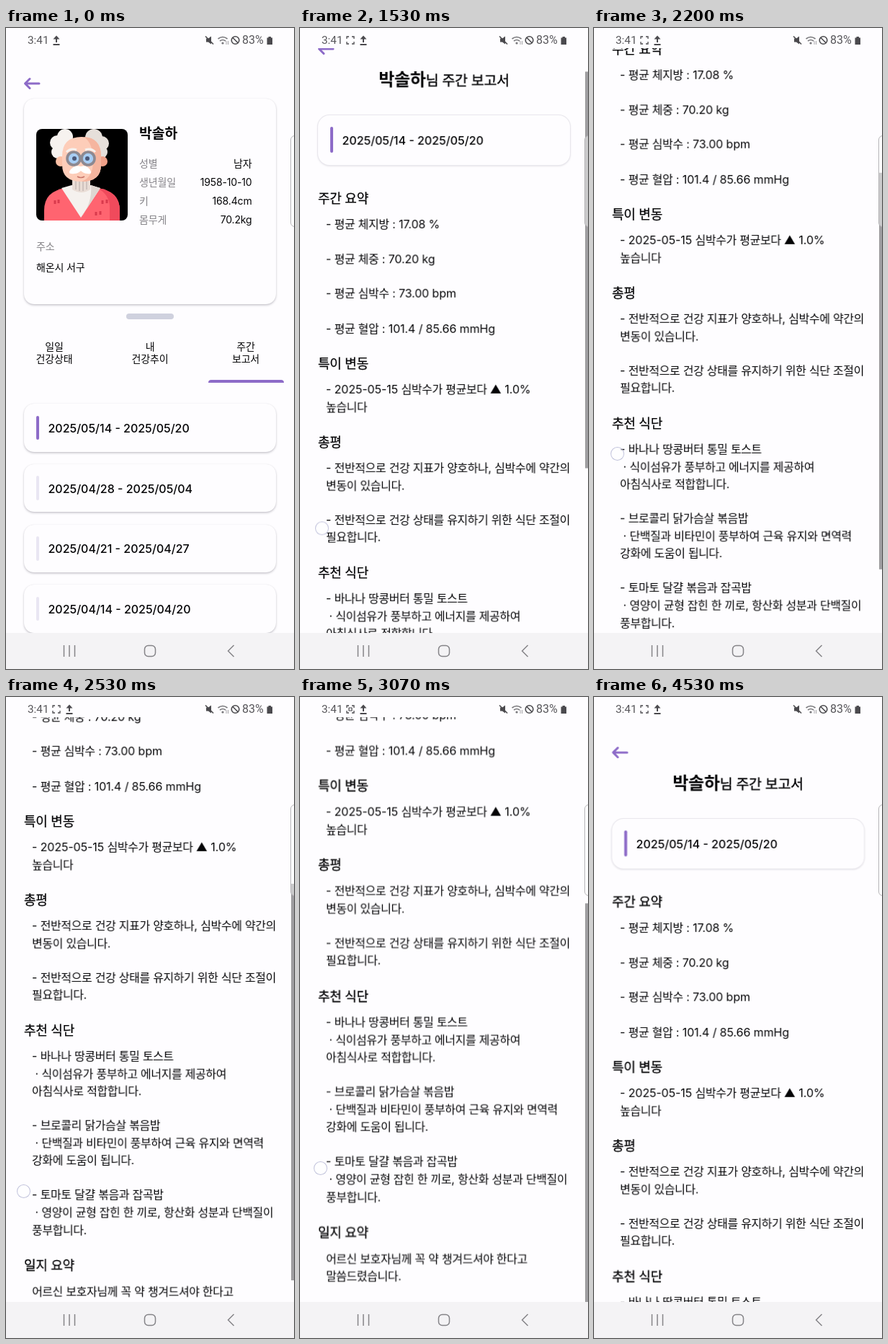
Animation, 400 px wide and 889 px high, one loop 5070 ms. Source, as an HTML page:

```html
<!DOCTYPE html>
<html lang="ko">
<head>
<meta charset="utf-8">
<title>주간 보고서</title>
<style>
  html, body { margin: 0; width: 100%; height: 100%; overflow: hidden; background: #fefdff; }
  #stage { position: relative; width: 400px; height: 889px; overflow: hidden; background: #fefdff;
    font-family: Inter, "Noto Sans CJK KR", "Noto Sans CJK", sans-serif; color: #050507; }
  #stage div, #stage svg, #stage i { position: absolute; box-sizing: border-box; }
  .view { left: 0; top: 28px; width: 400px; height: 811px; overflow: hidden; background: #fefdff; }
  .page { left: 0; top: -28px; width: 400px; height: 1240px; }
  #stretch { left: 0; top: 0; width: 400px; height: 811px; transform-origin: 50% 100%; }
  .t { line-height: 24px; white-space: pre; }
  .body { font-size: 16px; letter-spacing: -.1px; }
  .body span { letter-spacing: -.4px; }
  .head { font-size: 18px; font-weight: 500; letter-spacing: -.2px; -webkit-text-stroke: .25px; }
  .date { font-size: 16px; font-weight: 500; }
  .small { font-size: 14px; letter-spacing: -.15px; }
  .grey { color: #858388; }
  .right { transform: translateX(-100%); }
  .mid { transform: translateX(-50%); }
  .name { font-size: 19.3px; font-weight: 600; }
  .title { font-size: 19.5px; font-weight: 500; letter-spacing: -.25px; -webkit-text-stroke: .35px; }
  .title b { font-size: 24px; font-weight: 600; -webkit-text-stroke: 0; }
  .card { left: 25px; width: 350px; border-radius: 14px; background: #fefdff;
    box-shadow: 0 1.5px 3px rgba(40, 35, 55, .26), 0 0 1px rgba(40, 35, 55, .1); }
  .flat { border-radius: 16px; box-shadow: 0 0 0 1px #e9e7ed, 0 1px 3px rgba(40, 35, 55, .2); }
  .bar { left: 42px; width: 4px; border-radius: 2px; background: #8d6bc8; }
  .bone { border-radius: 4px; overflow: hidden; background: #f9f8fa; }
  .bone i { left: -70px; top: 0; bottom: 0; width: 240px; transform-origin: 50% 50%;
    background: linear-gradient(90deg, rgba(0,0,0,0), rgba(0,0,0,.05) 45%, rgba(0,0,0,.05) 55%, rgba(0,0,0,0)); }
  #thumb { left: 396px; top: 0; width: 4px; height: 549.5px; background: #9f9ea1; }
  #handle { left: 395px; top: 149px; width: 12px; height: 127px; border-radius: 6px;
    border: 1px solid #b6b5b8; background: rgba(255, 255, 255, .45); }
  #finger { left: -9.5px; top: -9.5px; width: 19px; height: 19px; border-radius: 50%;
    border: 1.3px solid rgba(150, 154, 195, .6); background: rgba(255, 255, 255, .45); }
  #nav { left: 0; top: 839px; width: 400px; height: 50px; background: #f4f3f5; }
  .clock { font: 15.3px/24px Roboto, sans-serif; color: #57565a; }
</style>
</head>
<body>
<div id="stage">
  <div class="view">
    <div id="stretch">
      <div class="page" id="report">
        <div class="card flat" style="top:169px;height:69px"></div>
        <div class="bar" style="top:185px;height:36px"></div>
        <div id="loaded"></div>
        <div id="skeleton"></div>
      </div>
      <div id="thumb"></div>
    </div>
  </div>

  <div class="view" id="listView">
    <div class="page" id="list">
      <div class="card" style="top:98px;height:285px"></div>
      <svg style="left:42px;top:140px;border-radius:8px" width="127" height="127" viewBox="42 140 127 127">
        <rect x="42" y="140" width="127" height="127"/>
        <g fill="#f6f2ef">
          <circle cx="82" cy="151" r="11"/><circle cx="71" cy="159" r="10"/>
          <circle cx="72" cy="172" r="9"/><circle cx="84" cy="165" r="13"/>
        </g>
        <g fill="#e6dfda">
          <circle cx="122" cy="152" r="12"/><circle cx="133" cy="160" r="10"/>
          <circle cx="132" cy="172" r="9"/><circle cx="120" cy="165" r="13"/>
        </g>
        <circle cx="76" cy="185" r="7" fill="#fbc0a6"/>
        <circle cx="134" cy="185" r="7" fill="#f0a189"/>
        <path d="M53 267v-14q0-27 30-31h44q31 4 31 31v14z" fill="#ff6470"/>
        <path d="M127 222q31 4 31 31v14h-14v-18q0-18-17-27z" fill="#f04a5c"/>
        <path d="M77 222l14-4h27l13 4-27 41z" fill="#f5f1ee"/>
        <path d="M118 218l13 4-27 41q16-20 14-45z" fill="#ded6d1"/>
        <path d="M92 205h25v19q-12 8-25 0z" fill="#e9dcd5"/>
        <path d="M97 211v13M102 211v15M107 211v15M112 211v13" stroke="#c9bcb8" stroke-width="1.6"/>
        <path d="M78 178q0-27 27-27t27 27v12q0 23-27 23t-27-23z" fill="#fdcdb9"/>
        <path d="M108 151q24 1 24 27v12q0 23-27 23 16-6 16-28 0-26-13-34z" fill="#f5b59f"/>
        <g fill="#a8cdf3" stroke="#8d8991" stroke-width="3.6">
          <circle cx="94" cy="181" r="9"/><circle cx="114" cy="181" r="9"/>
        </g>
        <g fill="#4b5878"><circle cx="95" cy="181" r="3"/><circle cx="113" cy="181" r="3"/></g>
        <path d="M84 172q6-6 14-3M110 169q8-3 14 3" stroke="#f6f2ef" stroke-width="3" fill="none"/>
        <path d="M104 192q9-3 14 7 1 4-5 3-5 0-9-4-4 4-9 4-8 1-7-3 6-10 16-7z" fill="#fff"/>
        <path d="M99 206q5 3 10 0" stroke="#c9776a" stroke-width="1.6" fill="none"/>
        <path d="M68 239v5M73 238v5M134 239v5M140 238v5M125 255v5M131 254v5" stroke="#d93a4d" stroke-width="3"/>
      </svg>
      <div style="left:167px;top:396px;width:66px;height:8px;border-radius:4px;background:#cfd1de"></div>
      <div style="left:281px;top:487.5px;width:105px;height:4px;border-radius:4px 4px 0 0;background:#8d6bc8"></div>
    </div>
  </div>

  <div id="finger"></div>
  <div id="handle"></div>

  <div class="t clock" style="left:30px;top:5px">3:41</div>
  <div class="t clock" style="left:328px;top:5px;font-size:16px">83%</div>
  <svg width="400" height="28" fill="none" stroke="#4b4a4e" stroke-width="1.6">
    <g id="upload">
      <path d="M88 20v-7M83.5 23h9" stroke-width="2"/>
      <path d="M83.5 15.5l4.5-5 4.5 5z" fill="#4b4a4e" stroke="none"/>
    </g>
    <path id="corners" d="M65 15v-3h3M72 12h3v3M75 19v3h-3M68 22h-3v-3" stroke-width="1.3"/>
    <path id="core" d="M68 15h4v4h-4z" stroke-width="1.2"/>
    <path d="M278 14.5h3l4-3v11l-4-3h-3z" fill="#4b4a4e" stroke="none"/>
    <path d="M277 11.5l11 11"/>
    <path d="M294.500 15q6.500-5 13 0M297 18q4-3 8 0" stroke="#77767a"/>
    <circle cx="301" cy="21" r="1.6" fill="#77767a" stroke="none"/>
    <path d="M306 18v5M308.500 23v-5" stroke="#a3a2a6" stroke-width="1"/>
    <circle cx="318.500" cy="17" r="5.300"/>
    <path d="M314.800 13.300l7.400 7.400"/>
    <path d="M362.500 13.500h2v-1.500h3.500v1.500h2v9.500h-7.500z" fill="#4b4a4e" stroke="none"/>
  </svg>

  <div id="nav">
    <svg width="400" height="50" fill="none" stroke="#858488" stroke-width="1.5">
      <path d="M80.500 17v16M88 17v16M95.500 17v16M316.500 17l-8 8 8 8"/>
      <rect x="192.500" y="17.500" width="15" height="15" rx="5"/>
    </svg>
  </div>
</div>

<script>
const LOOP = 5070, TICKS = 76;
const $ = id => document.getElementById(id);

function add(parent, cls, css, html = '') {
  const el = document.createElement('div');
  el.className = cls;
  el.style.cssText = css;
  el.innerHTML = html;
  parent.append(el);
  return el;
}
// x is the anchor, y the middle of the line
const text = (parent, cls, x, y, str) =>
  add(parent, 't ' + cls, `left:${x}px;top:${y - 12}px`, str);
// Hangul is set tighter than Latin
const tight = str => str.replace(/[가-힣]+/g, '<span>$&</span>');

const report = $('report'), list = $('list'), loaded = $('loaded'), skeleton = $('skeleton');
const NAME = '박솔하';
const arrow = '<svg width="26" height="20" fill="none" stroke="#8d6bc8" stroke-width="3" ' +
  'stroke-linecap="round" stroke-linejoin="round"><path d="M22 10H3M9 3.500L2.500 10 9 16.500"/></svg>';
for (const page of [report, list]) add(page, '', 'left:24px;top:67px', arrow);

// Patient card and list
text(list, 'name', 185, 146, NAME);
[['성별', '남자'], ['생년월일', '1958-10-10'], ['키', '168.4cm'], ['몸무게', '70.2kg']]
  .forEach(([label, value], i) => {
    const y = 187.5 + i * 26.3;
    text(list, 'small grey', 185, y, label);
    text(list, 'small right', 341.5, y, value);
  });
text(list, 'small grey', 42, 303, '주소');
text(list, 'small', 42, 331.5, '해온시 서구');
[['일일', '건강상태'], ['내', '건강추이'], ['주간', '보고서']].forEach((tab, i) =>
  tab.forEach((s, row) => text(list, 'small mid', 67 + i * 133, 441.5 + row * 17, s)));
['2025/05/14 - 2025/05/20', '2025/04/28 - 2025/05/04',
 '2025/04/21 - 2025/04/27', '2025/04/14 - 2025/04/20'].forEach((s, i) => {
  const y = 521.3 + i * 83.6;
  add(list, 'card', `top:${y}px;height:66.5px`);
  add(list, 'bar', `top:${y + 16.5}px;height:33.5px` + (i ? ';background:#e9e6f3' : ''));
  text(list, 'date', 58.5, y + 33.7, s);
});

// Report
[[285, '주간 요약'], [514, '특이 변동'], [623, '총평'], [804, '추천 식단']]
  .forEach(([y, s]) => text(report, 'head', 25, y, s));
text(loaded, 'title mid', 200, 119.5, `<b>${NAME}</b>님 주간 보고서`);
text(loaded, 'date', 58.5, 204, '2025/05/14 - 2025/05/20');
text(loaded, 'head', 25, 1129.5, '일지 요약');
const blocks = [
  [320, '- 평균 체지방 : 17.08 %||- 평균 체중 : 70.20 kg||- 평균 심박수 : 73.00 bpm||- 평균 혈압 : 101.4 / 85.66 mmHg'],
  [549, '- 2025-05-15 심박수가 평균보다 ▲ 1.0%|높습니다'],
  [658, '- 전반적으로 건강 지표가 양호하나, 심박수에 약간의|변동이 있습니다.||' +
    '- 전반적으로 건강 상태를 유지하기 위한 식단 조절이|필요합니다.'],
  [838.5, '- 바나나 땅콩버터 통밀 토스트| · 식이섬유가 풍부하고 에너지를 제공하여|아침식사로 적합합니다.||' +
    '- 브로콜리 닭가슴살 볶음밥| · 단백질과 비타민이 풍부하여 근육 유지와 면역력|강화에 도움이 됩니다.||' +
    '- 토마토 달걀 볶음과 잡곡밥| · 영양이 균형 잡힌 한 끼로, 항산화 성분과 단백질이|풍부합니다.'],
  [1164.5, '어르신 보호자님께 꼭 약 챙겨드셔야 한다고|말씀드렸습니다.']
];
for (const [y, s] of blocks)
  s.split('|').forEach((line, i) => line && text(loaded, 'body', 36, y + i * 24.1, tight(line)));

for (const [x, y, w, h] of [[58, 191, 300, 21], [36, 308, 340, 83], [36, 537, 340, 104],
                            [36, 646, 340, 63], [36, 827, 340, 83]])
  add(skeleton, 'bone', `left:${x}px;top:${y}px;width:${w}px;height:${h}px`, '<i></i>');
text(skeleton, 'head', 25, 623, '총평');

// Motion: every track is [ms, value, easing to the next], snapped to the screen's ticks
const snap = ms => Math.round(ms / LOOP * TICKS) / TICKS;
function play(el, prop, track) {
  const rows = [...track];
  if (rows[0][0] > 0) rows.unshift([0, rows[0][1]]);
  rows.push([LOOP, rows[rows.length - 1][1]]);
  el.animate(rows.map(([ms, value, easing = 'linear']) => ({ offset: snap(ms), [prop]: value, easing })),
    { duration: LOOP, delay: -10, iterations: Infinity, easing: `steps(${TICKS}, end)` });
}
const show = (el, ...spans) => play(el, 'opacity',
  [[0, 0, 'steps(1)'], ...spans.flatMap(([a, b]) => [[a, 1, 'steps(1)'], [b, 0, 'steps(1)']])]);
const map = (track, fn) => track.map(([ms, v, e]) => [ms, fn(v), e]);

const scroll = [
  [0, 0], [1400, 0], [1600, 72, 'ease-out'], [1800, 107], [1930, 112], [2000, 118],
  [2200, 255, 'ease-out'], [2470, 338], [2530, 341], [2660, 386],
  [3200, 386, 'ease-in-out'], [3600, -2], [3730, 0]
];
play(report, 'transform', map(scroll, v => `translateY(${-v}px)`));
play($('thumb'), 'transform', map(scroll, v => `translateY(${Math.max(0, v) * 0.6775}px)`));
play($('thumb'), 'opacity', [[0, 0, 'steps(1)'], [1400, 1], [4000, 1], [4330, 0]]);
play($('stretch'), 'transform', map(
  [[2660, 1], [2800, 1.012], [2930, 1], [3000, 1], [3070, 1.006], [3200, 1]], v => `scaleY(${v})`));

play($('finger'), 'transform', map([
  [0, [120, 572]], [1330, [120, 572], 'steps(1)'],
  [1400, [30, 740]], [1600, [30, 670], 'steps(1)'],
  [1930, [33, 730]], [2200, [32, 590], 'steps(1)'],
  [2470, [24, 688]], [2530, [24, 685]], [2660, [25, 640]], [2800, [26, 600], 'steps(1)'],
  [2930, [28, 700]], [3070, [28, 653], 'steps(1)'],
  [3200, [26, 355], 'ease-in-out'], [3600, [24, 743]]
], ([x, y]) => `translate(${x}px, ${y}px)`));
show($('finger'), [330, 530], [1400, 1670], [1930, 2270], [2470, 2870], [2930, 3130], [3200, 3670]);

play($('listView'), 'opacity', [[0, 1], [530, 1], [730, 0]]);
show(skeleton, [530, 1130]);
show(loaded, [1130, LOOP]);
for (const sheen of skeleton.querySelectorAll('i')) {
  play(sheen, 'transform', map([[930, 0], [1130, 110]], v => `translateX(${v}px) skewX(-18deg)`));
  show(sheen, [930, 1130]);
}

play($('upload'), 'transform', [[0, 'translateX(-18px)', 'steps(1)'], [330, 'translateX(0px)']]);
show($('corners'), [330, LOOP]);
show($('core'), [3000, 3130]);
</script>
</body>
</html>
```
